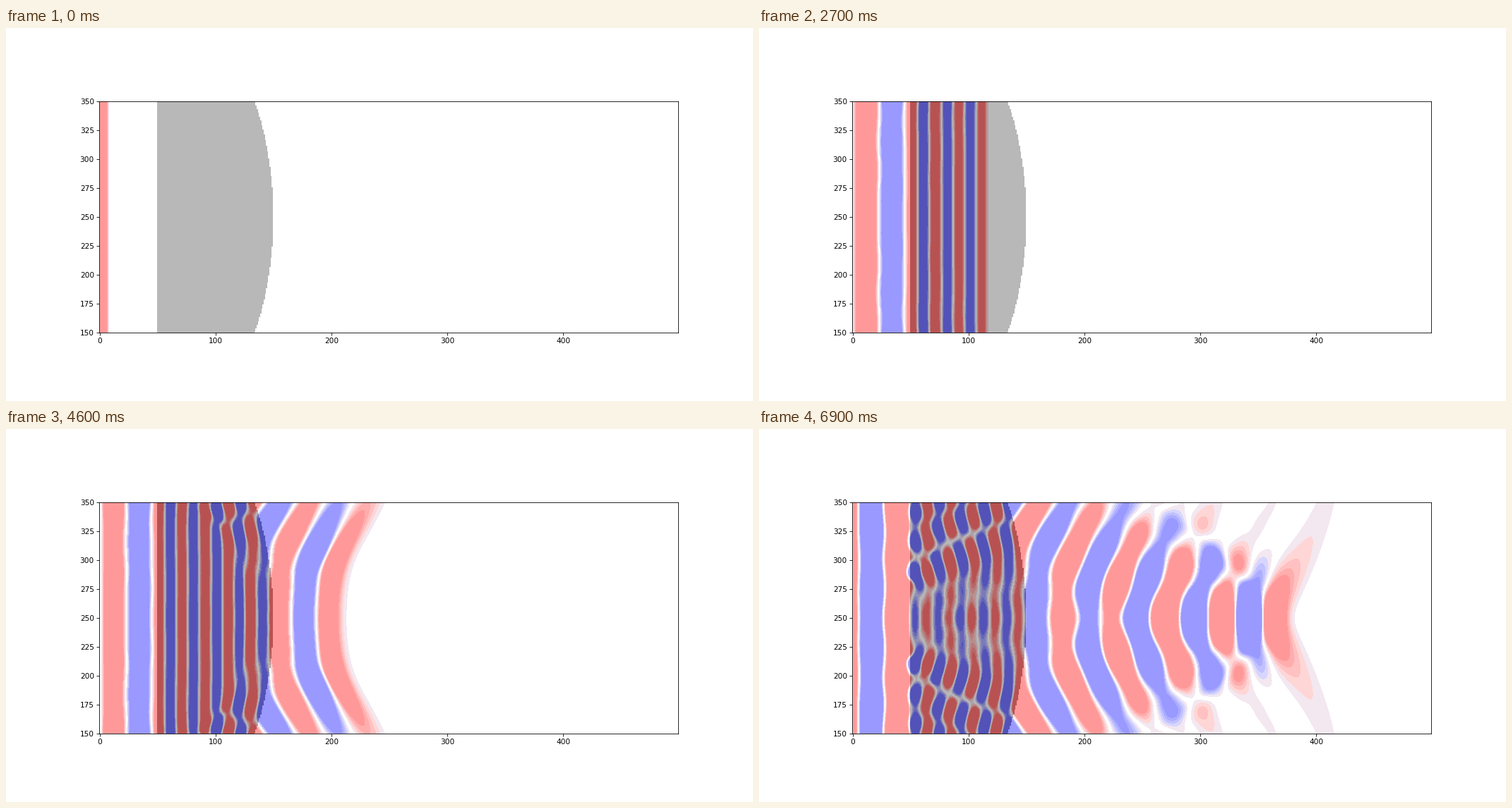
These frames come from a looping animation (1058 px wide and 529 px high, 7 s). A matplotlib script:

```python
import numpy as np
import matplotlib.pyplot as plt
from matplotlib.animation import FuncAnimation
from matplotlib.colors import BoundaryNorm, ListedColormap

FRAMES, INTERVAL = 70, 100
STEPS_PER_FRAME, FIRST_STEP = 10, 11
NY, NX = 501, 500
Y_LOW, Y_HIGH = 150, 350
OMEGA = 0.1

# Plano-convex lens: flat face at x = 50, spherical face touching x = 150.
FLAT_X, APEX_X, RADIUS, AXIS_Y = 50, 150, 320, 250
SOURCE = (slice(100, 401), 1)

y, x = np.mgrid[:NY, :NX]
lens = (x >= FLAT_X) & (
    (x - APEX_X + RADIUS) ** 2 + (y - AXIS_Y) ** 2 < RADIUS ** 2)


def simulate():
    """Leapfrog solution of the wave equation, one snapshot per frame."""
    courant2 = np.where(lens, 0.1, 0.5).astype(np.float32)[1:-1, 1:-1]
    now = np.zeros((NY, NX), np.float32)
    before = np.zeros_like(now)
    snapshots = []
    for step in range(1, FIRST_STEP + STEPS_PER_FRAME * (FRAMES - 1) + 1):
        core = now[1:-1, 1:-1]
        laplacian = (now[2:, 1:-1] + now[:-2, 1:-1]
                     + now[1:-1, 2:] + now[1:-1, :-2] - 4 * core)
        before[1:-1, 1:-1] = 2 * core - before[1:-1, 1:-1] + courant2 * laplacian
        before[SOURCE] = np.sin(OMEGA * step)
        now, before = before, now
        elapsed = step - FIRST_STEP
        if elapsed >= 0 and elapsed % STEPS_PER_FRAME == 0:
            snapshots.append(now[Y_LOW:Y_HIGH + 1].copy())
    return snapshots


def band_colors():
    strengths = (0.4, 0.6, 0.8, 1.0)
    faint = (0.894, 0.776, 0.855)
    reds = [(1, 1 - s, 1 - s) for s in strengths]
    blues = [(1 - s, 1 - s, 1) for s in reversed(strengths)]
    return blues + [faint, (1, 1, 1), faint] + reds


edges = np.append(0.07 * np.arange(1, 6), 10)
bounds = np.concatenate([-edges[::-1], edges])
wave_map = ListedColormap(band_colors())
wave_norm = BoundaryNorm(bounds, wave_map.N)

fields = simulate()

fig, ax = plt.subplots(figsize=(14, 7), dpi=75.5715)
fig.subplots_adjust(bottom=0.1085, top=0.8785)
extent = (-0.5, NX - 0.5, Y_LOW - 0.5, Y_HIGH + 0.5)
ax.imshow(lens[Y_LOW:Y_HIGH + 1], origin="lower", extent=extent,
          cmap=ListedColormap(["white", "#8a8a8a"]), interpolation="nearest")
wave = ax.imshow(fields[0], origin="lower", extent=extent, cmap=wave_map,
                 norm=wave_norm, alpha=0.4, interpolation="bilinear",
                 interpolation_stage="data")
ax.set_ylim(Y_LOW, Y_HIGH)


def update(frame):
    wave.set_data(fields[frame])
    return [wave]


animation = FuncAnimation(fig, update, frames=FRAMES, interval=INTERVAL,
                          repeat=True, repeat_delay=0)
plt.show()
```
